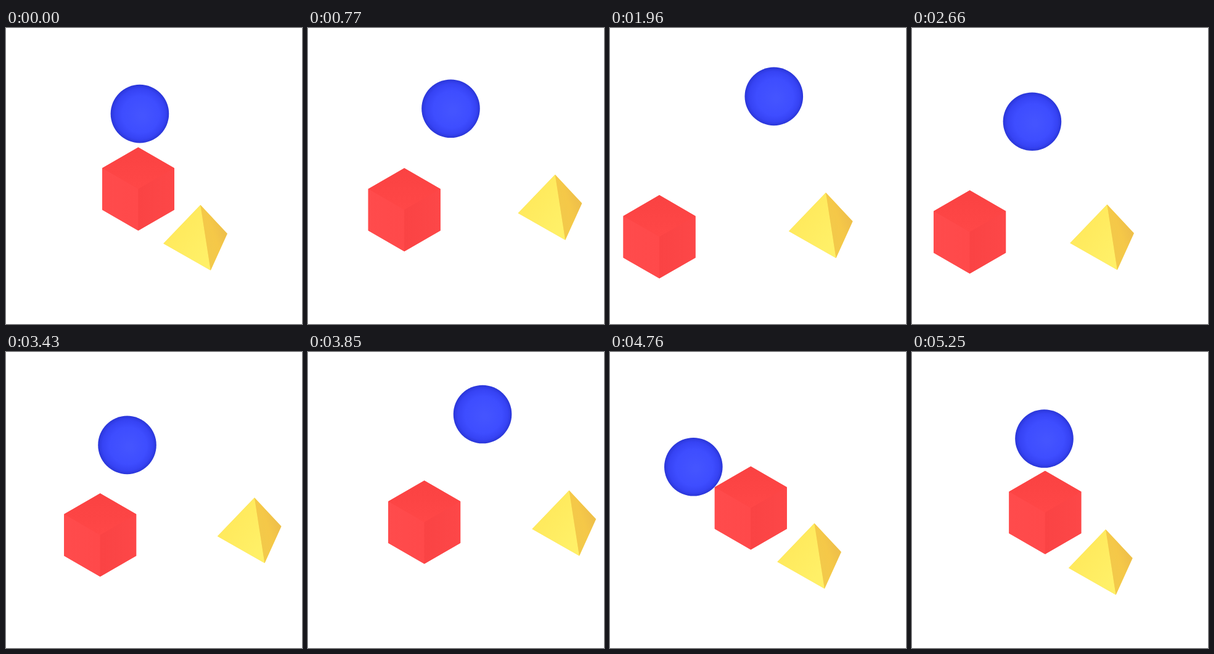
Recreate the animation shown at these times as an HTML page with a canvas. Size 480 by 480 pixels, loop 5.32 s.

```html
<!DOCTYPE html>
<html lang="en">
<head>
<meta charset="utf-8">
<title>Sliding solids</title>
<style>
  html, body { margin: 0; width: 100%; height: 100%; overflow: hidden; background: #fff; }
  canvas { display: block; width: 480px; height: 480px; }
</style>
</head>
<body>
<canvas id="stage" width="480" height="480"></canvas>
<script>
const ctx = document.getElementById('stage').getContext('2d');
const STEP = 70, STEPS = 76;
const SLOPE = Math.tan(Math.PI / 6);

// Swing along the isometric axis; phase in degrees, rate in degrees per step.
const solids = [
  { draw: sphere, x: 210, y: 143.1, reach: 75.3, phase: -84.7, rate: 14.375 },
  { draw: cube, x: 153.5, y: 296.2, reach: 74.8, phase: 35.4, rate: 4.775 },
  { draw: pyramid, x: 367.7, y: 256.7, reach: 56.1, phase: 201, rate: 9.549 }
];

function linear(x0, y0, x1, y1, ...colors) {
  const g = ctx.createLinearGradient(x0, y0, x1, y1);
  colors.forEach((c, i) => g.addColorStop(i / (colors.length - 1), c));
  return g;
}

function poly(fill, ...points) {
  ctx.beginPath();
  points.forEach(([x, y]) => ctx.lineTo(x, y));
  ctx.closePath();
  ctx.fillStyle = fill;
  ctx.fill();
}

// Origin: centre
function sphere() {
  const g = ctx.createRadialGradient(4, 3, 4, 0, 0, 47.3);
  g.addColorStop(0, '#4454ff');
  g.addColorStop(0.6, '#3e4dff');
  g.addColorStop(0.85, '#3643f4');
  g.addColorStop(1, '#2a36d8');
  ctx.beginPath();
  ctx.arc(0, 0, 47.3, 0, Math.PI * 2);
  ctx.fillStyle = g;
  ctx.fill();
}

// Origin: front corner
function cube() {
  const w = 58.5, h = 33.7, d = 67.5;
  const top = [0, -d], right = [w, -h], left = [-w, -h], mid = [0, 0];
  const lowR = [w, d - h], lowL = [-w, d - h], low = [0, d];
  poly('#fc4545', top, right, lowR, low, lowL, left);
  poly(linear(0, -d, 0, 0, '#fa4242', '#ff4747'), top, right, mid, left);
  poly(linear(-w, 0, 0, 0, '#ff4b4c', '#ff494a'), left, mid, low, lowL);
  poly(linear(0, 0, w, 0, '#fa4344', '#fd4748'), mid, right, lowR, low);
}

// Origin: apex
function pyramid() {
  const apex = [0, 0], left = [-60, 62.5], low = [16.5, 106], right = [43.5, 46.5];
  poly('#fbdc55', apex, right, low, left);
  poly(linear(-45, 35, 10, 80, '#ffe95c', '#fff067'), apex, low, left);
  poly(linear(7, 52, 36, 42, '#f3c94a', '#f5c848', '#efc04a'), apex, right, low);
}

function frame(now) {
  const n = Math.floor(now / STEP) % STEPS;
  ctx.fillStyle = '#fff';
  ctx.fillRect(0, 0, 480, 480);
  for (const s of solids) {
    const dx = s.reach * Math.cos((s.phase + s.rate * n) * Math.PI / 180);
    ctx.save();
    ctx.translate(s.x + dx, s.y - dx * SLOPE);
    s.draw();
    ctx.restore();
  }
}

const start = performance.now();
function tick() {
  frame(performance.now() - start);
  requestAnimationFrame(tick);
}
tick();
</script>
</body>
</html>
```
